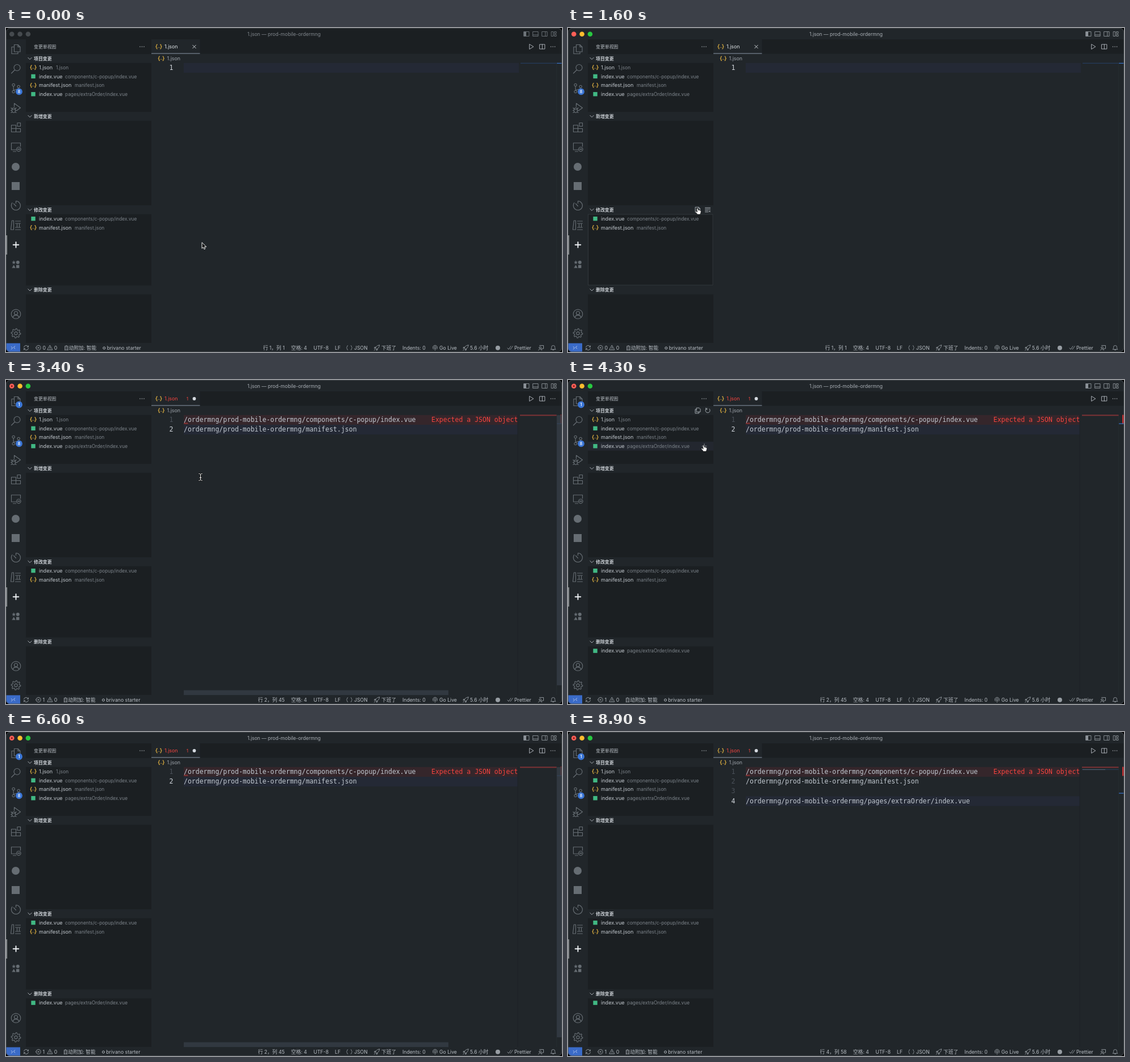
Recreate the animation shown at these times as an HTML page. Size 979 by 572 pixels, loop 9000 ms.

```html
<!DOCTYPE html>
<html lang="zh">
<head>
<meta charset="utf-8">
<style>
html, body { margin: 0; width: 100%; height: 100%; overflow: hidden; background: #000; }
svg { display: block; width: 979px; height: 572px; }
text { font-family: Inter, "Noto Sans CJK SC", "Noto Sans CJK", sans-serif; white-space: pre; }
.code { font-family: "DejaVu Sans Mono", monospace; font-size: 11.5px; }
</style>
</head>
<body>
<svg id="stage" viewBox="0 0 979 572">
  <clipPath id="window"><rect width="979" height="572" rx="7"/></clipPath>
  <g clip-path="url(#window)"><g id="base"></g><g id="live"></g></g>
  <rect x=".5" y=".5" width="978" height="571" rx="7" fill="none" stroke="#4a5055" stroke-opacity=".7"/>
</svg>
<script>
const LOOP = 9000, STEP = 100;
const BG = '#21262a', DARK = '#1b1f22', GREY = '#666d73', MID = '#979da3', LIGHT = '#b8bec4', RED = '#f5443f', BLUE = '#3a6bc8';
const ROW = 15.7, LINE = 17.2, LINE_TOP = 61.8;

const rect = (x, y, w, h, fill, extra = '') =>
  `<rect x="${x}" y="${y}" width="${w}" height="${h}" fill="${fill}" ${extra}/>`;
const circle = (x, y, r, fill, extra = '') =>
  `<circle cx="${x}" cy="${y}" r="${r}" fill="${fill}" ${extra}/>`;
const text = (x, y, str, size, fill = LIGHT, extra = '') =>
  `<text x="${x}" y="${y}" font-size="${size}" fill="${fill}" ${extra}>${str}</text>`;
const code = (x, y, str, fill, extra = '') =>
  `<text class="code" x="${x}" y="${y}" fill="${fill}" ${extra}>${str}</text>`;
// Line icon drawn around its own centre
const icon = (x, y, d, color = GREY, width = 1.1, fill = 'none') =>
  `<path transform="translate(${x} ${y})" d="${d}" fill="${fill}" stroke="${color}" stroke-width="${width}" stroke-linejoin="round" stroke-linecap="round"/>`;
const ring = r => `M${-r} 0a${r} ${r} 0 1 0 ${2 * r} 0a${r} ${r} 0 1 0 ${-2 * r} 0z`;

const BRACES = 'M-2.8 -3.8C-4.8 -3.8 -3.2 -.6 -5 0C-3.2 .6 -4.8 3.8 -2.8 3.8M2.8 -3.8C4.8 -3.8 3.2 -.6 5 0C3.2 .6 4.8 3.8 2.8 3.8';
const jsonIcon = (x, y) => icon(x, y, BRACES + 'M-1.2 1.5h.01M1.2 1.5h.01', '#e3b341', 1.2);
const vueIcon = (x, y) => rect(x - 3.7, y - 3.7, 7.4, 7.4, '#41b883');
const badge = (x, y, n) => circle(x, y, 5.9, '#3b76d6') +
  text(x, y + 2.5, n, 7, '#fff', 'text-anchor="middle" font-weight="600"');
const dots = (x, y) => [-3.5, 0, 3.5].map(d => circle(x + d, y, .75, LIGHT)).join('');

const ICONS = {
  files: 'M-3 -8H3.5L7.5 -4V4.5H-3zM3.5 -8V-4H7.5M-3 -4H-7.5V8H3.5V4.5',
  search: 'M-3.5 -2a5.5 5.5 0 1 0 11 0a5.5 5.5 0 1 0 -11 0M-2 2L-8 8',
  git: 'M-6.5 -6a2.2 2.2 0 1 0 4.4 0a2.2 2.2 0 1 0 -4.4 0M-6.5 6a2.2 2.2 0 1 0 4.4 0a2.2 2.2 0 1 0 -4.4 0M2.5 -3a2.2 2.2 0 1 0 4.4 0a2.2 2.2 0 1 0 -4.4 0M-4.3 -3.8V3.8M4.7 -.8C4.5 3 -2 1 -4 3.8',
  debug: 'M-3 -2V-8L8 0L1 5M-7 3.5a3 3.5 0 1 1 6 0v1.5a3 3.5 0 1 1 -6 0zM-7 2.7H-1M-8.5 0L-6.5 2M.5 0L-1.5 2M-9 4.5H-7M-1 4.5H1M-8.5 8.5L-6.5 7M.5 8.5L-1.5 7',
  extensions: 'M-8 -4H0V8H-8zM-8 2H8M0 2H8V8H0M2.5 -8H8V-2H2.5z',
  remote: 'M0 5H-8V-7H8V-1M-5 8H0M1 4a3.8 3.8 0 1 0 7.6 0a3.8 3.8 0 1 0 -7.6 0M3.2 3l1 1l-1 1M6.5 3l-1 1l1 1',
  timer: 'M0 -8A8 8 0 1 1 -6.5 -4.8M0 -8V-4M-4 -3.5L0 1',
  books: 'M-7 -8H-4V8H-9zM-4 -8V8M-1 -7H8M-1 -3H8M2 -2V3M6 -2V3M-1 4H8M-1 8H8',
  account: ring(8.2) + 'M-3 -1.8a3 3 0 1 0 6 0a3 3 0 1 0 -6 0M-5.4 6C-4 .5 4 .5 5.4 6',
  rocket: 'M4.5 -4.5C0 -4.5 -2 -1 -2.5 .5L-.5 2.5C1 2 4.5 0 4.5 -4.5zM-1.8 -1H-4L-4.5 1L-2.5 .5M1 1.8V4L-1 4.5L-.5 2.5M-3 2.5L-4.5 4.5',
  sync: 'M-4 -1A4 4 0 0 1 3.6 -1.6M4 1A4 4 0 0 1 -3.6 1.6M3.9 -3.6V-1.4H1.7M-3.9 3.6V1.4H-1.7',
  trash: 'M-3.6 -3H3.6M-1.2 -3V-4.3H1.2V-3M-2.8 -3V4H2.8V-3M-1 -1V2.4M1 -1V2.4',
  filePlus: 'M-4 -4.5H1.5L4 -2V4.5H-4zM1.5 -4.5V-2H4M-1 -.7L-2.2 .8L-1 2.3M1 -.7L2.2 .8L1 2.3',
  clear: 'M-4.5 -3.5H4.5M-4.5 -1H4.5M-4.5 1.5H.5M-4.5 4H.5M2 1.5L4.5 4M4.5 1.5L2 4',
  copy: 'M-2 -4.5H2.5L4.5 -2.5V2.5H-2zM-2 -2H-4.5V5H2V2.5',
  refresh: 'M3 -2.8A4 4 0 1 1 -1 -3.9M-3.2 -4.5V-2H-.8',
  plus: 'M-4 0H4M0 -4V4',
  pane: 'M-4.5 -4H4.5V4H-4.5z'
};

const gear = () => {
  let d = ring(2.6);
  for (let i = 0; i <= 32; i++) {
    const a = i * Math.PI / 16, r = i % 4 < 2 ? 8.3 : 6.1;
    d += `${i ? 'L' : 'M'}${(r * Math.cos(a)).toFixed(2)} ${(r * Math.sin(a)).toFixed(2)}`;
  }
  return d;
};

const file = (vue, name, path, dx) => ({ vue, name, path, dx });
const popup = file(1, 'index.vue', 'components/c-popup/index.vue', 104);
const manifest = file(0, 'manifest.json', 'manifest.json', 121);
const order = file(1, 'index.vue', 'pages/extraOrder/index.vue', 104);
const SECTIONS = [
  { title: '项目变更', top: 46, end: 148, rows: [file(0, '1.json', '1.json', 88), popup, manifest, order], tools: ['copy', 'refresh'], action: 'plus' },
  { title: '新增变更', top: 148, end: 313, rows: [] },
  { title: '修改变更', top: 313, end: 454.5, rows: [popup, manifest] },
  { title: '删除变更', top: 454.5, end: 556, rows: [] }
];
const rowTop = (s, i) => s.top + 15.8 + i * ROW;

function fileRow(s, f, i) {
  const y = rowTop(s, i) + ROW / 2;
  return (f.vue ? vueIcon : jsonIcon)(48, y) + text(58, y + 3.2, f.name, 9.1, '#c2c8ce') +
    text(f.dx, y + 3.2, f.path, 8.3, '#7d848b');
}

function drawBase() {
  let out = rect(0, 0, 979, 572, BG) + rect(35, 20, 221, 536, DARK) + rect(256, 20, 723, 25.5, DARK) +
    rect(256, 20, 85.5, 25.5, BG) + rect(256, 44.5, 85.5, 1, '#8b98a8');

  // Activity bar
  ['files', 'search', 'git', 'debug', 'extensions', 'remote', , , 'timer', 'books'].forEach((name, i) => {
    out += icon(17.5, 37.5 + i * 34.5, ICONS[name], GREY, 1.15);
  });
  out += circle(17, 245, 7, GREY) + rect(10, 272, 14, 14, GREY) +
    icon(17.5, 382.7, 'M-4.8 0H4.8M0 -4.8V4.8', '#eef1f4', 1.9) + rect(0, 366, 1.6, 34, '#e4e8ec') +
    icon(13.7, 413.7, 'M0 -3L.9 -1L3 -.8L1.4 .7L1.9 2.8L0 1.7L-1.9 2.8L-1.4 .7L-3 -.8L-.9 -1z', GREY, .3, GREY) +
    circle(20.8, 413.7, 3, GREY) + icon(13.7, 421, 'M0 -2.6L2.9 2.6H-2.9z', GREY, .3, GREY) +
    rect(18, 418.4, 5.4, 5.4, GREY) +
    icon(17.5, 505, ICONS.account, GREY, 1.15) + icon(17.5, 539, gear(), GREY, 1.15) + badge(23, 112.3, 8);

  // Sidebar
  out += text(49, 36, '变更单视图', 7.9) + dots(239.5, 33);
  for (const s of SECTIONS) {
    out += rect(35, s.top, 221, 15.8, BG) + icon(42, s.top + 7.9, 'M-3.2 -1.6L0 1.6L3.2 -1.6', LIGHT, .9) +
      text(49, s.top + 10.8, s.title, 7.9, '#c9ced3', 'font-weight="700"');
  }

  // Editor toolbar and breadcrumb
  out += icon(925, 33, 'M-3 -4.2L3.8 0L-3 4.2z', LIGHT, .9) +
    icon(944.3, 33, ICONS.pane + 'M0 -4V4', LIGHT, .9) + dots(963, 33) +
    jsonIcon(269, 33) + jsonIcon(273.3, 53.8) + text(283.5, 57, '1.json', 8.9, '#a0a7ae') +
    rect(969.5, 62, .6, 494, '#2b3035');

  // Status bar
  const status = (x, str) => text(x, 567.7, str, 8.7);
  const mark = (x, d) => icon(x, 564.5, d, MID, .9);
  out += rect(0, 556.5, 25, 16, BLUE) +
    icon(12.5, 564.5, 'M-3.3 -1.8L-.8 .4L-3.3 2.6M3.3 -2.8L.8 -.6L3.3 1.6', '#cfdaf0', .8) +
    mark(35.5, ICONS.sync) + mark(57, ring(4.1) + 'M-1.5 -1.5L1.5 1.5M1.5 -1.5L-1.5 1.5') +
    mark(77.5, 'M0 -4.2L4.4 3.6H-4.4zM0 -1.2V1M0 2.4V2.5') + status(84.8, '0') +
    status(502, '空格: 4') + status(541.5, 'UTF-8') + status(579, 'LF') + mark(604.5, BRACES) +
    status(613, 'JSON') + mark(653, ICONS.rocket) + status(661, '下班了') + status(698, 'Indents: 0') +
    mark(755.5, 'M-2.6 2.8A4 4 0 1 1 2.6 2.8M-1.3 1.2A2 2 0 1 1 1.3 1.2M0 0V4.4') +
    status(763, 'Go Live') + mark(809.5, ICONS.rocket) + status(817, '5.6 小时') +
    circle(866, 564.7, 4, MID) + mark(887.5, 'M-4.5 .5L-2.5 2.8L1.5 -2.8M.2 2.2L.8 2.8L4.8 -2.8') +
    status(895, 'Prettier') +
    mark(942, 'M-2.5 -4H4.5V1.5H2.5L1 3V1.5M-3.2 -.2a1.7 1.7 0 1 0 3.4 0a1.7 1.7 0 1 0 -3.4 0M-4.5 4.4C-4 1.5 1 1.5 1.3 4.4') +
    mark(963.5, 'M-4 2.6C-2.8 1.5 -3 0 -3 -1A3 3 0 0 1 3 -1C3 0 2.8 1.5 4 2.6zM-1 3.8H1');
  return out;
}

// Pointer tip: time, x, y
const PATH = [[0, 345, 379], [200, 345, 379], [500, 262, 360], [600, 238, 352], [700, 224.5, 336.5], [900, 227, 318],
  [1600, 227, 318], [2300, 384.5, 194], [3200, 384.5, 194], [3900, 237.5, 115], [4600, 237.5, 115], [5300, 226.5, 461],
  [5800, 226.5, 461], [6300, 640, 91], [9000, 640, 91]];
const ACTIVE = 300, PASTE = 3000, MARK = 4100, ENTER_1 = 7000, ENTER_2 = 7200, PASTE_2 = 7500;

function pointerAt(t) {
  const i = PATH.findIndex(p => p[0] > t), [t0, x0, y0] = PATH[i - 1], [t1, x1, y1] = PATH[i];
  const k = (t - t0) / (t1 - t0);
  return [x0 + (x1 - x0) * k, y0 + (y1 - y0) * k];
}

function pointer(t) {
  // Typing hides the pointer
  if ((t >= 2900 && t < 3200) || t >= 6500) return '';
  const [x, y] = pointerAt(t);
  if (t < ACTIVE) return icon(x, y, 'M0 0V10.2L2.4 8L4 11.6L5.8 10.8L4.3 7.3H7.4z', '#f2f2f2', 1, '#111');
  if (x > 256) {
    const beam = 'M-2.8 -6C-1 -6 0 -5.5 0 -4.5V4.5C0 5.5 -1 6 -2.8 6M2.8 -6C1 -6 0 -5.5 0 -4.5M0 4.5C0 5.5 1 6 2.8 6M-1.5 1H1.5';
    return icon(x, y, beam, '#111', 2.4) + icon(x, y, beam, '#f2f2f2', 1);
  }
  return icon(x, y, 'M-.4 .6C.1 -.3 1.4 -.1 1.7 .9L2.3 3.6C3.2 3 3.9 3.3 4.1 3.9C5 3.5 5.6 3.9 5.8 4.5C6.7 4.3 7.2 4.8 7.2 5.6C7.2 7.8 6.5 8.8 5.8 11H.7C0 9 -1.9 7.8 -2.7 6.5C-2.8 5.4 -1.4 5.2 -.2 6.3L.5 6.7z', '#111', .7, '#fff');
}

function sidebar(t) {
  let out = '';
  // Hover feedback trails the pointer by one step
  const [mx, my] = pointerAt(Math.max(0, t - STEP));
  const inside = t >= ACTIVE && mx > 35 && mx < 256;
  SECTIONS.forEach((s, n) => {
    const rows = n === 3 && t >= MARK ? [order] : s.rows;
    const over = inside && my >= s.top && my < s.end;
    const hovered = over ? Math.floor((my - rowTop(s, 0)) / ROW) : -1;
    rows.forEach((f, i) => {
      const y = rowTop(s, i);
      if (i === hovered) {
        out += rect(35, y, 221, ROW, '#23272f') + icon(240, y + ROW / 2, ICONS[s.action || 'trash'], MID, .9);
      }
      out += fileRow(s, f, i);
    });
    if (over) (s.tools || ['filePlus', 'clear']).forEach((name, i) => {
      out += icon(228.5 + i * 17.5, s.top + 7.8, ICONS[name], LIGHT, .85);
    });
  });
  if (t >= 500 && t < 2300) out += rect(35.5, 329, 219.5, 125, 'none', 'stroke="#33383d"');
  return out;
}

function editor(t) {
  const edited = t >= PASTE, root = '/ordermng/prod-mobile-ordermng/';
  const lines = edited ? [root + 'components/c-popup/index.vue', root + 'manifest.json'] : [''];
  if (t >= ENTER_1) lines.push('');
  if (t >= ENTER_2) lines.push(t >= PASTE_2 ? root + 'pages/extraOrder/index.vue' : '');
  const last = lines.length - 1, width = edited ? 588 : 590;
  let out = '';
  if (edited) out += rect(313, LINE_TOP, 588, LINE, '#35262b');
  out += rect(313, LINE_TOP + last * LINE, width, LINE, '#242935');
  lines.forEach((line, i) => {
    const y = 74 + i * LINE;
    out += code(294.5, y, i + 1, i === last ? '#d0d5db' : '#4a5159', 'text-anchor="end"') + code(313, y, line, '#c2c9d1');
  });

  out += text(279, 36.2, '1.json', 8.9, edited ? RED : '#dde1e5');
  if (edited) {
    out += code(749, 74, 'Expected a JSON object', RED) +
      icon(313.5, 77, 'M0 0l1.5 -1.2l1.7 1.6l1.7 -1.6l1.5 1.2', RED, .9) +
      text(319.5, 36, 1, 8, RED, 'text-anchor="middle"') + circle(331.5, 33, 2.9, '#d5dae0') +
      rect(900.6, 62, .6, 494, '#1c2024') + rect(905, 61.3, 64.5, 2, '#7c3236') +
      rect(976, 61.5, 3, 16, '#c62f31') + badge(23, 43.5, 1);
    if (last > 2) out += rect(905, 65.7, 64.5, 1, '#294262') + rect(906, 65.9, 40, .7, '#6c7580');
  } else {
    out += icon(331.5, 33, 'M-2.8 -2.8L2.8 2.8M2.8 -2.8L-2.8 2.8', '#c9ced3', 1) + rect(906, 61.7, 63.5, 1, '#25406c');
  }
  out += rect(970, edited ? 76.5 + (last - 1) * 15.5 : 61.7, 9, 1.2, '#3975cf');

  if ((t >= 3200 && t < 3700) || (t >= 6100 && t < 7800)) {
    out += rect(313, 547.7, 466, 8.5, '#343b45', 'opacity=".85"') + rect(970, 62, 9, 477, '#343b45', 'opacity=".85"');
  }
  out += text(490.7, 567.7, `行 ${last + 1}，列 ${lines[last].length + 1}`, 8.7, LIGHT, 'text-anchor="end"') +
    text(64.5, 567.7, edited ? 1 : 0, 8.7) + text(edited ? 100.5 : 102, 567.7, '自动附加: 智能', 8.7) +
    circle(edited ? 171.5 : 172.8, 565, 2, 'none', `stroke="${LIGHT}"`) +
    text(edited ? 176.3 : 177.7, 567.7, 'brivano starter', 8.7);
  return out;
}

function titleBar(t) {
  const active = t >= ACTIVE, color = active ? '#8d9399' : '#6f757b';
  const lights = active ? ['#ff5f57', '#febc2e', '#28c840'] : Array(3).fill('#454a4e');
  const layout = (x, d) => icon(x, 10.5, d, color, .9);
  return rect(0, 0, 979, 20, active ? BG : DARK) +
    lights.map((c, i) => circle(10.3 + i * 14.3, 10.7, 4.3, c)).join('') +
    (t >= PASTE ? circle(10.3, 10.7, 1.5, '#7c1713') : '') +
    text(489.5, 13.8, '1.json — prod-mobile-ordermng', 8.55, active ? '#a8aeb4' : '#81878d', 'text-anchor="middle"') +
    rect(912, 6.5, 4, 8, color) + layout(916.5, ICONS.pane) + layout(932.5, ICONS.pane + 'M-4.5 1.5H4.5') +
    layout(948.5, ICONS.pane + 'M1.2 -4V4') + layout(964.5, 'M-4 -4H-.8V4H-4zM1.4 -4H4.4V-1H1.4zM1.4 1H4.4V4H1.4z');
}

const live = document.getElementById('live');
document.getElementById('base').innerHTML = drawBase();
const start = performance.now();
let shown = -1;

function frame() {
  const t = Math.floor((performance.now() - start) % LOOP / STEP) * STEP;
  if (t !== shown) {
    live.innerHTML = titleBar(t) + sidebar(t) + editor(t) + pointer(t);
    shown = t;
  }
  requestAnimationFrame(frame);
}
frame();
</script>
</body>
</html>
```
